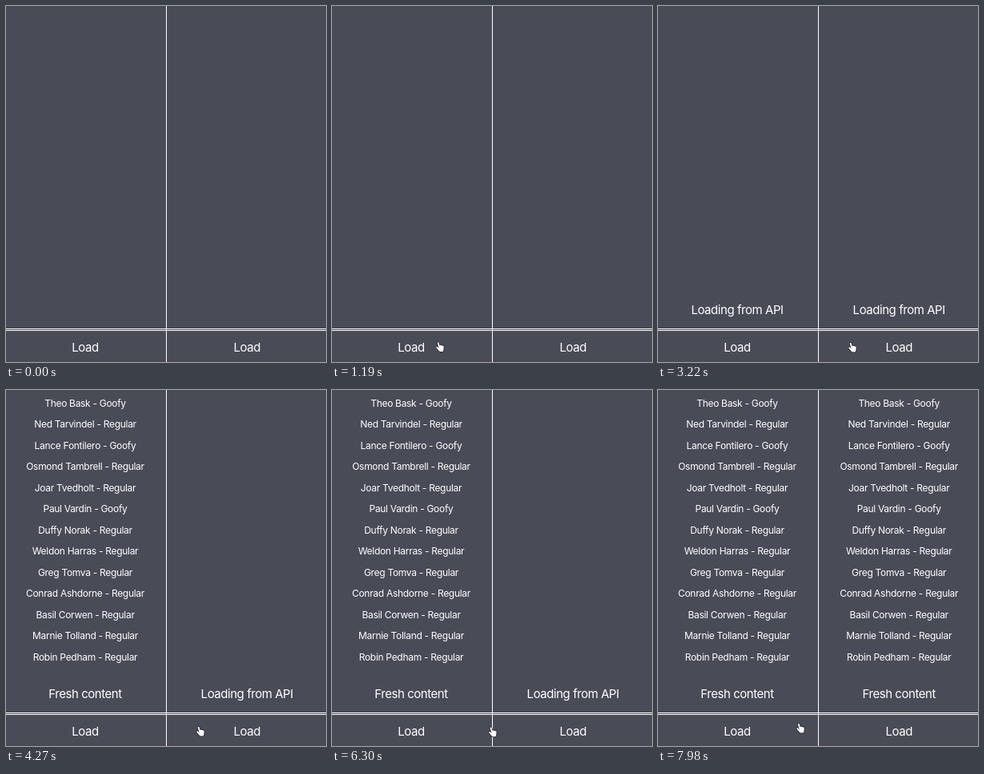
An HTML page for the animation above (8000 ms loop, 400x446 px).

```html
<!DOCTYPE html>
<html lang="en">
<head>
<meta charset="utf-8">
<title>Loading lists</title>
<style>
  html, body { margin: 0; width: 100%; height: 100%; overflow: hidden; background: #494b57; }
  svg { display: block; width: 400px; height: 446px; }
  text {
    font: 15px Inter, "Open Sans", sans-serif;
    letter-spacing: -.03em;
    text-anchor: middle;
    fill: #fff;
  }
  .row { font-size: 12px; letter-spacing: -.025em; }
  .rule { fill: #fff; }
  #hand path { fill: none; stroke: #fff; stroke-width: 1.9; stroke-linecap: round; }
  #hand .edge { stroke: #1d1d24; stroke-width: 3.3; }
</style>
</head>
<body>
<svg viewBox="0 0 400 446">
  <rect class="rule" y="404" width="400" height="1"/>
  <rect class="rule" y="406" width="400" height="1"/>
  <rect class="rule" x="200" width="1" height="446"/>
  <g id="columns"></g>
  <g id="hand"></g>
</svg>
<script>
const LOOP = 8000, STEP = 70;

const riders = {
  regular: "Ned Tarvindel, Osmond Tambrell, Joar Tvedholt, Duffy Norak, Weldon Harras, Greg Tomva, "
    + "Conrad Ashdorne, Basil Corwen, Marnie Tolland, Robin Pedham",
  goofy: "Theo Bask, Lance Fontilero, Paul Vardin"
};

// the goofy riders take every third place from the top, but no further than the sixth
const regular = riders.regular.split(", "), goofy = riders.goofy.split(", ");
const goofyRows = new Set([0, 2, 5]);
const rows = Array.from({ length: regular.length + goofy.length }, (_, i) =>
  goofyRows.has(i) ? `${goofy.shift()} - Goofy` : `${regular.shift()} - Regular`);

const columns = [
  { x: 99, click: 1260, done: 4200 },
  { x: 301.2, click: 1820, done: 7490 }
];

// each move eases to (x, y); bend bows it downwards, or upwards if negative
const home = { x: 306, y: 456 };
const moves = [
  { from: 210, to: 630, x: 160, y: 437, bend: -28 },
  { from: 700, to: 1120, x: 135.3, y: 427, bend: 4 },
  { from: 1400, to: 1820, x: 243.3, y: 427.6, bend: 11 },
  { from: 6020, to: 6440, x: 186.4, y: 424.6, bend: 4 },
  { from: 7840, to: 7980, x: 178.4, y: 423.6, bend: 0 }
];

function make(tag, attrs, parent, content = "") {
  const el = document.createElementNS("http://www.w3.org/2000/svg", tag);
  for (const key in attrs) el.setAttribute(key, attrs[key]);
  el.textContent = content;
  return parent.appendChild(el);
}

const root = document.getElementById("columns");
const hand = document.getElementById("hand");

for (const col of columns) {
  const x = col.x;
  make("text", { x, y: 433 }, root, "Load");
  col.status = make("text", { x, y: 386 }, root);
  col.list = make("g", {}, root);
  rows.forEach((row, i) => make("text", { x, y: 20.8 + 26.5 * i, class: "row" }, col.list, row));
}

// index finger, thumb, three knuckles and the palm as round strokes
const knuckles = [0, 1, 2].map(i => `M${.5 + 1.5 * i} ${-1.2 + .5 * i}L${.6 + 1.2 * i} 4.6`).join("");
const d = `M-2.6-4.9L-.4 3M-4.1.6L-1 4.4${knuckles}M0 5H2.8`;
make("path", { d, class: "edge" }, hand);
make("path", { d }, hand);

const smooth = k => k * k * (3 - 2 * k);

function pointerAt(t) {
  let { x, y } = home;
  for (const m of moves) {
    if (t < m.from) break;
    const k = smooth(Math.min(1, (t - m.from) / (m.to - m.from)));
    x += (m.x - x) * k;
    y += (m.y - y) * k + m.bend * Math.sin(Math.PI * k);
  }
  return [x, y];
}

function draw(now) {
  const t = Math.floor((now % LOOP) / STEP) * STEP;
  for (const { click, done, status, list } of columns) {
    const label = t < click ? "" : t < done ? "Loading from API" : "Fresh content";
    if (status.textContent !== label) status.textContent = label;
    list.style.display = t < done ? "none" : "";
  }
  hand.setAttribute("transform", `translate(${pointerAt(t)})`);
}

const start = performance.now();
function tick() {
  draw(performance.now() - start);
  requestAnimationFrame(tick);
}
tick();
</script>
</body>
</html>
```
